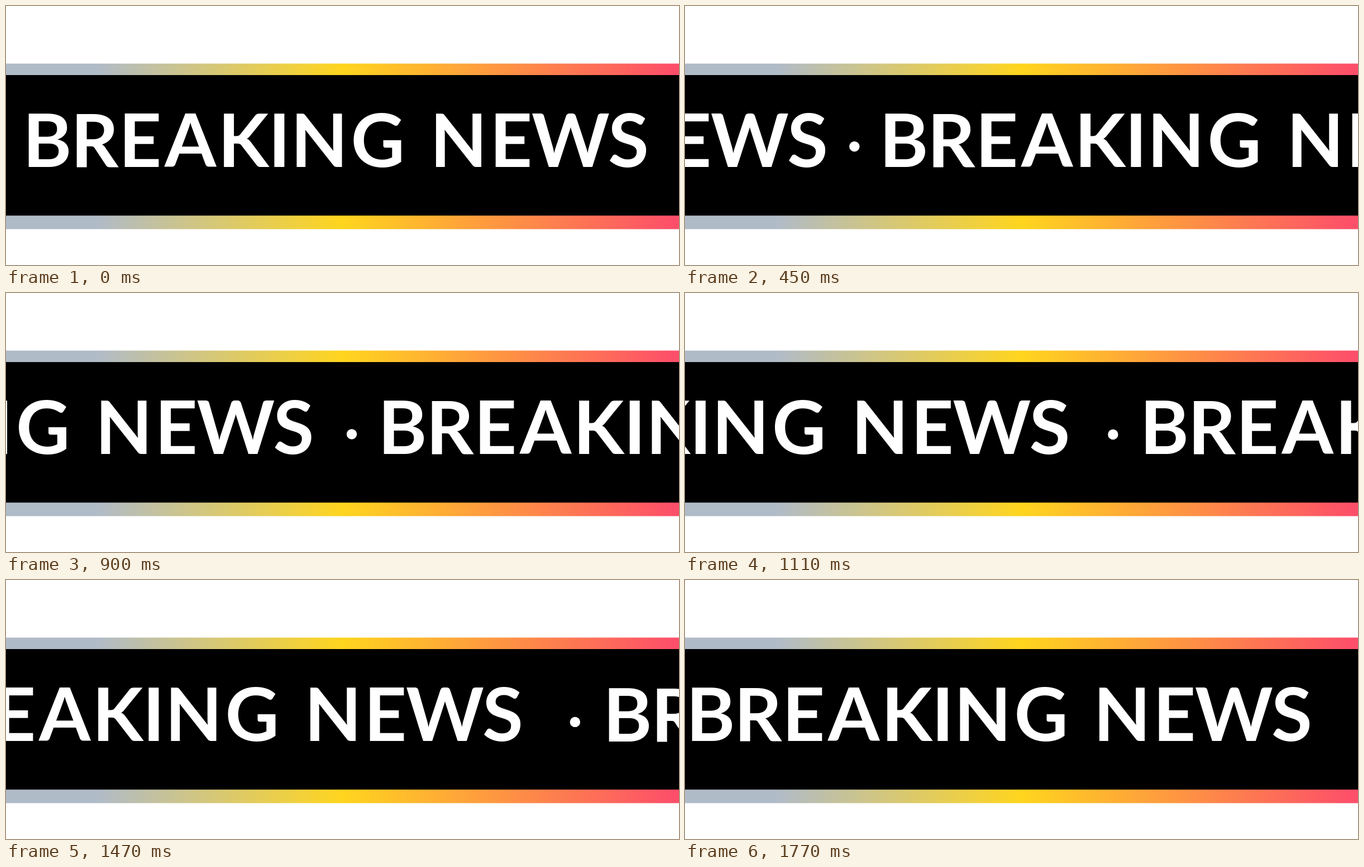
An HTML page with a canvas for the animation above (1800 ms loop, 1205 by 465 pixels).

```html
<!DOCTYPE html>
<html lang="en">
<head>
<meta charset="utf-8">
<title>Breaking news</title>
<style>
  html, body { margin: 0; width: 100%; height: 100%; overflow: hidden; background: #fff; }
  canvas { display: block; }
</style>
</head>
<body>
<canvas id="stage" width="1205" height="465"></canvas>
<script>
const WIDTH = 1205, HEIGHT = 465, LOOP = 1800, STEP = 30;
const ctx = document.getElementById('stage').getContext('2d');
ctx.font = '700 133px Lato, sans-serif';

const stripe = ctx.createLinearGradient(0, 0, WIDTH, 0);
stripe.addColorStop(0, '#b0bbc8');
stripe.addColorStop(0.135, '#b0bbc8');
stripe.addColorStop(0.5, '#ffd51e');
stripe.addColorStop(0.99, '#fd4f69');
stripe.addColorStop(1, '#fd4f69');

// Optical centres of the letters, relative to the left edge of the headline
const centres = [35, 123, 202, 289.5, 390, 448.3, 519.7, 623.5, 769.2, 866, 970, 1073];
const letters = [...'BREAKINGNEWS'].map((char, i) => {
  const box = ctx.measureText(char);
  const inkCentre = (box.actualBoundingBoxRight - box.actualBoundingBoxLeft) / 2;
  return { char, x: centres[i] - inkCentre };
});

function bar(y, height, fill) {
  ctx.fillStyle = fill;
  ctx.fillRect(0, y, WIDTH, height);
}

function headline(x, baseline) {
  for (const letter of letters) ctx.fillText(letter.char, x + letter.x, baseline);
}

function draw(t) {
  bar(0, HEIGHT, '#fff');
  bar(103.4, 297.2, stripe);
  bar(124, 252.3, '#000');

  // The two headlines and the dot drift right at slightly different speeds
  ctx.fillStyle = '#fff';
  headline(41 + 0.7068 * t, 288.5 + 0.0007 * t);
  if (t > 0) headline(-1149.5 + 0.6568 * t, 288.5 + 0.0003 * t);
  ctx.beginPath();
  ctx.arc(-12.3 + 0.7015 * t, 251.1 + 0.0026 * t, 9.2, 0, Math.PI * 2);
  ctx.fill();
}

function tick() {
  const t = performance.now() % LOOP;
  draw(Math.floor(t / STEP) * STEP);
  requestAnimationFrame(tick);
}
tick();
</script>
</body>
</html>
```
